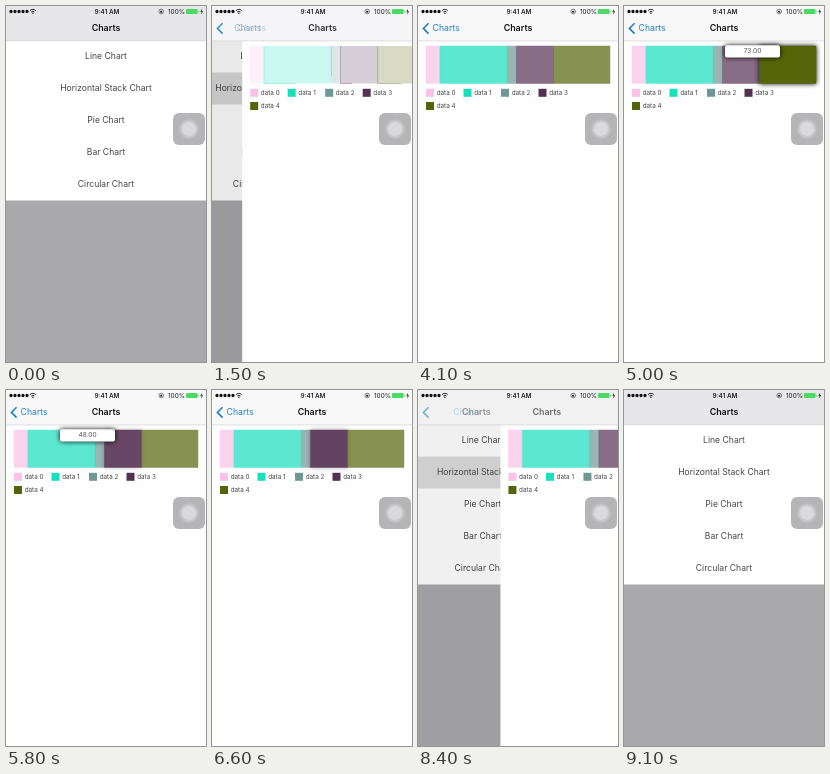
An HTML page that plays this animation: 200x356 px, repeating every 10 s.

```html
<!DOCTYPE html>
<html lang="en">
<head>
<meta charset="utf-8">
<title>Charts</title>
<style>
@property --push { syntax: "<number>"; inherits: true; initial-value: 0; }
@property --draw { syntax: "<number>"; inherits: true; initial-value: 0; }
@property --on { syntax: "<number>"; inherits: false; initial-value: 0; }

html, body { margin: 0; width: 100%; height: 100%; overflow: hidden; background: #fff; }
svg {
  display: block; width: 100vw; height: 100vh;
  font-family: Inter, Roboto, sans-serif;
  --spring: linear(0, .18, .455, .671, .812, .897, .945, .971, .985, .992, .996, .998, 1);
  animation: push 10s infinite, draw 10s linear infinite;
}

/* screen change */
@keyframes push {
  0%, 11.7% { --push: 0; animation-timing-function: var(--spring); }
  17.7%, 82.5% { --push: 1; animation-timing-function: var(--spring); }
  88.5%, 100% { --push: 0; }
}
/* bars fill in while their outlines are traced */
@keyframes draw {
  0%, 11.8% { --draw: 0; }
  21.65%, 89.9% { --draw: 1; }
  90%, 100% { --draw: 0; }
}
.list { transform: translateX(calc(-60px * var(--push))); }
.dim { opacity: calc(.1 * var(--push)); }
.page { transform: translateX(calc(200px * (1 - var(--push)))); }
.bar, .chevron { opacity: var(--push); }

.row { font-size: 8.6px; fill: #454547; text-anchor: middle; }
.hit { animation: hit 10s infinite linear; }
@keyframes hit {
  0%, 11.7% { opacity: 0; }
  11.9%, 83.5% { opacity: 1; }
  88.9%, 100% { opacity: 0; }
}

.title { font-size: 8.9px; font-weight: 600; text-anchor: middle; fill: #111; }
.old { opacity: calc(1 - var(--push)); transform: translateX(calc(-71px * var(--push))); }
.new { opacity: var(--push); transform: translateX(calc(70px * (1 - var(--push)))); }
.back { transform: translateX(calc(50px * (1 - var(--push)))); }
.back text { font-size: 8.7px; fill: #1c83c6; animation: back 10s infinite linear; }
@keyframes back {
  0%, 13.3% { opacity: 0; }
  16.7%, 82.5% { opacity: 1; }
  84.5%, 100% { opacity: 0; }
}

.seg {
  opacity: calc(.7 + .3 * var(--on));
  filter: drop-shadow(0 0 2.7px rgba(0, 0, 0, calc(var(--on) * var(--on) * var(--on))));
  animation: 10s infinite ease;
}
.seg path {
  fill-opacity: var(--draw); stroke-width: .5;
  stroke-dasharray: 1 2; stroke-dashoffset: calc(1 - var(--draw));
}
.s1 { animation-name: s1; }
.s2 { animation-name: s2; }
.s3 { animation-name: s3; }
.s4 { animation-name: s4; }
@keyframes s1 {
  0%, 22.8%, 31.1%, 68.8%, 73.3%, 100% { --on: 0; }
  25.3%, 28.6%, 70.6%, 70.8% { --on: 1; }
}
@keyframes s2 {
  0%, 33.9%, 40.5%, 100% { --on: 0; }
  36.4%, 38% { --on: 1; }
}
@keyframes s3 {
  0%, 57.1%, 68%, 100% { --on: 0; }
  59.6%, 65.5% { --on: 1; }
}
@keyframes s4 {
  0%, 44.9%, 55.5%, 100% { --on: 0; }
  47.4%, 53% { --on: 1; }
}

.tip { opacity: 0; animation: 10s infinite step-end; filter: drop-shadow(0 0 2.4px #000); }
.tip text { font-size: 6.6px; fill: #555; text-anchor: middle; }
.t1 { animation-name: t1; }
.t2 { animation-name: t2; }
.t3 { animation-name: t3; }
.t4 { animation-name: t4; }
@keyframes t1 {
  0%, 28.6%, 70.8%, 100% { opacity: 0; }
  22.9%, 68.9% { opacity: 1; }
}
@keyframes t2 { 0%, 38%, 100% { opacity: 0; } 34% { opacity: 1; } }
@keyframes t3 { 0%, 65.5%, 100% { opacity: 0; } 57.2% { opacity: 1; } }
@keyframes t4 { 0%, 53%, 100% { opacity: 0; } 45% { opacity: 1; } }

.key { font-size: 6.3px; fill: #454547; }
.status { font-size: 6.4px; fill: #222; }
</style>
</head>
<body>
<svg viewBox="0 0 200 356">
  <g class="list">
    <rect width="260" height="356" fill="#a9a8aa"/>
    <rect width="260" height="194.5" fill="#fff"/>
    <rect class="hit" y="66.5" width="200" height="32" fill="#d9d9d9"/>
    <g class="row" id="rows"></g>
    <rect class="dim" width="260" height="356"/>
  </g>

  <g class="page">
    <rect y="35" width="200" height="321" fill="#fefefe"/>
    <g id="bars"></g>
    <g id="keys"></g>
    <g id="tips"></g>
  </g>

  <rect width="200" height="35" fill="#e7e7e9"/>
  <rect class="bar" width="200" height="35" fill="#f8f8f9"/>
  <rect y="34.7" width="200" height=".5" fill="#c4c4c6"/>
  <text class="title old" x="100" y="25.4">Charts</text>
  <text class="title new" x="100" y="25.4">Charts</text>
  <path class="chevron" d="M10.6 17.2 5.4 22.4l5.2 5.2" fill="none" stroke="#1c83c6" stroke-width="1.6"/>
  <g class="back"><text x="14.6" y="25.4">Charts</text></g>

  <g class="status">
    <path d="M5 5.5h16.2" stroke="#111" stroke-width="3.3" stroke-linecap="round" stroke-dasharray="0 4" fill="none"/>
    <g fill="none" stroke="#111" stroke-width=".9">
      <path d="M24 4.6a4 4 0 0 1 5.8 0"/>
      <path d="M25.3 6a2.3 2.3 0 0 1 3.2 0"/>
    </g>
    <circle cx="26.9" cy="7.3" r=".8"/>
    <text x="101" y="7.8" text-anchor="middle" font-weight="600">9:41 AM</text>
    <circle cx="155.2" cy="5.5" r="2.3" fill="none" stroke="#333" stroke-width=".6"/>
    <rect x="154.2" y="4.8" width="2" height="1.8"/>
    <text x="162" y="7.8">100%</text>
    <rect x="180" y="3.1" width="11.6" height="5" rx="1" fill="#4cd964"/>
    <rect x="192" y="4.7" width=".8" height="1.8" fill="#4cd964"/>
    <path d="M196.2 2.8l-2 3h1.4l-.6 2.6 2.2-3.2h-1.5z"/>
  </g>

  <rect x="167" y="107" width="32" height="32" rx="6" fill="#b5b4b6"/>
  <circle cx="183" cy="123" r="10" fill="#bfbec0"/>
  <circle cx="183" cy="123" r="8.6" fill="#c9c8ca"/>
  <circle cx="183" cy="123" r="7" fill="#dad9db"/>
</svg>
<script>
const put = (id, html) => { document.getElementById(id).innerHTML = html; };

const rows = ["Line Chart", "Horizontal Stack Chart", "Pie Chart", "Bar Chart", "Circular Chart"];
put("rows", rows.map((name, i) => `<text x="100" y="${53.2 + 32 * i}">${name}</text>`).join(""));

const data = [
  { value: 18, color: "#f9c2e6" },
  { value: 87, color: "#19dfbd", tip: 107 },
  { value: 12, color: "#6c9996", tip: 31 },
  { value: 48, color: "#553053", tip: 54 },
  { value: 73, color: "#566409", tip: 101 }
];
const total = data.reduce((sum, d) => sum + d.value, 0);
const scale = 184 / total;

let x = 8;
put("bars", data.map((d, i) => {
  const w = d.value * scale;
  const path = `M${x} 40v37.5h${w}v-37.5z`;
  x += w;
  return `<g class="seg s${i}"><path pathLength="1" d="${path}" fill="${d.color}" stroke="${d.color}"/></g>`;
}).join(""));

put("keys", data.map((d, i) => {
  const kx = 8 + 37.5 * (i % 4), ky = i < 4 ? 82.8 : 96;
  return `<rect x="${kx}" y="${ky}" width="8" height="8" fill="${d.color}"/>
    <text class="key" x="${kx + 10.7}" y="${ky + 6.3}">data ${i}</text>`;
}).join(""));

put("tips", data.map((d, i) => d.tip ? `<g class="tip t${i}">
    <rect x="${d.tip}" y="39.3" width="55" height="12.2" rx="2" fill="#fff"/>
    <text x="${d.tip + 27.5}" y="46.6">${d.value.toFixed(2)}</text></g>` : "").join(""));
</script>
</body>
</html>
```
